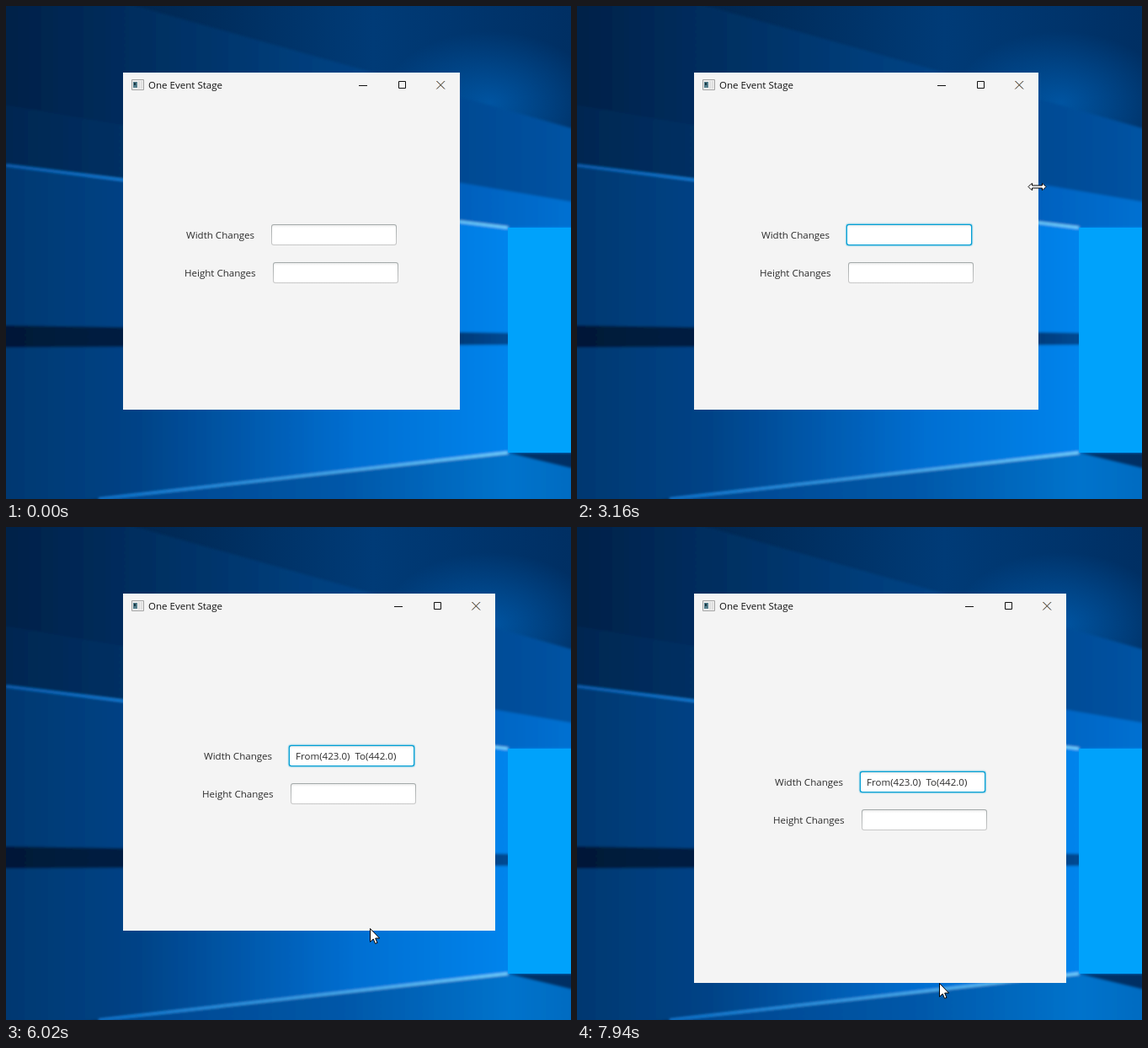
Recreate the animation shown at these times as an HTML page. Size 671 by 585 pixels, loop 8000 ms.

```html
<!DOCTYPE html>
<html lang="en">
<head>
<meta charset="utf-8">
<title>One Event Stage</title>
<style>
  html, body { margin: 0; width: 100%; height: 100%; overflow: hidden; background: #002047; }
  svg { display: block; width: 671px; height: 585px; }
  text { font: 11.55px "Open Sans", "Noto Sans", sans-serif; fill: #2b2b2b; white-space: pre; }
  #close path { mix-blend-mode: multiply; }
</style>
</head>
<body>
<svg viewBox="0 0 671 585">
  <defs>
    <linearGradient id="sky">
      <stop offset="0" stop-color="#001e43"/><stop offset=".3" stop-color="#002a57"/>
      <stop offset=".65" stop-color="#003b77"/><stop offset="1" stop-color="#002f63"/>
    </linearGradient>
    <linearGradient id="upper">
      <stop offset="0" stop-color="#002047"/><stop offset=".5" stop-color="#003d7a"/>
      <stop offset="1" stop-color="#0054a6"/>
    </linearGradient>
    <linearGradient id="middle">
      <stop offset="0" stop-color="#00264f"/><stop offset=".2" stop-color="#002f62"/>
      <stop offset=".8" stop-color="#0062c0"/><stop offset="1" stop-color="#0074d6"/>
    </linearGradient>
    <linearGradient id="floor">
      <stop offset="0" stop-color="#00376f"/><stop offset=".24" stop-color="#004387"/>
      <stop offset=".6" stop-color="#006fd2"/><stop offset="1" stop-color="#0090fb"/>
    </linearGradient>
    <linearGradient id="band">
      <stop offset="0" stop-color="#001836"/><stop offset=".8" stop-color="#002a5c"/>
      <stop offset="1" stop-color="#004a94"/>
    </linearGradient>
    <linearGradient id="ground">
      <stop offset="0" stop-color="#00438a"/><stop offset=".5" stop-color="#0057a8"/>
      <stop offset=".83" stop-color="#0073cc"/><stop offset="1" stop-color="#0068bc"/>
    </linearGradient>
    <radialGradient id="haze">
      <stop offset="0" stop-color="#0062b8" stop-opacity=".7"/>
      <stop offset="1" stop-color="#0062b8" stop-opacity="0"/>
    </radialGradient>
    <linearGradient id="ray" gradientUnits="userSpaceOnUse" x1="0" y1="0" x2="596" y2="0">
      <stop offset="0" stop-color="#0a60b4"/><stop offset=".24" stop-color="#1580dc"/>
      <stop offset="1" stop-color="#7ad6ff"/>
    </linearGradient>
    <linearGradient id="edge" x2="0" y2="1">
      <stop offset="0" stop-color="#a3a9a9"/><stop offset="1" stop-color="#c8c8c8"/>
    </linearGradient>
    <linearGradient id="inner" x2="0" y2="1">
      <stop offset="0" stop-color="#ececec"/><stop offset=".14" stop-color="#fff"/>
    </linearGradient>
    <filter id="soft"><feGaussianBlur stdDeviation="1.6"/></filter>
  </defs>

  <rect width="671" height="585" fill="url(#sky)"/>
  <ellipse cx="575" cy="115" rx="130" ry="85" fill="url(#haze)"/>
  <g filter="url(#soft)">
    <path d="M-10-46 700 153V300H-10Z" fill="url(#upper)"/>
    <path d="M-10 116 700 237V300H-10Z" fill="url(#middle)"/>
    <path d="M-10 188 596 263H700V530H596L110 585-10 600Z" fill="url(#floor)"/>
    <path d="M-10 379 600 388V402L-10 405Z" fill="url(#band)"/>
    <path d="M110 587 596 530 700 555V600H100Z" fill="url(#ground)"/>
    <path d="M0 189 596 263M110 585 596 530" stroke="url(#ray)" stroke-width="3"/>
  </g>
  <rect x="596" y="263" width="267" height="267" fill="#00a2fb"/>

  <g transform="translate(139 79)">
    <rect id="frame" fill="#f4f4f4"/>
    <path d="M10.5 8.5h14v12h-14z" fill="#eee" stroke="#a5a5a5"/>
    <path d="M12 11h5v7h-5z" fill="#527d8c"/>
    <path d="M13 12h2v3h-2z" fill="#183642"/>
    <path d="M19 10v9M22 10v9" stroke="#cfcfcf"/>
    <text x="30" y="19" style="fill:#111">One Event Stage</text>
    <g id="buttons" fill="none" stroke="#111">
      <path d="M-120 15.5h10M-72.5 10.5h8v8h-8z"/>
      <g id="close">
        <path d="M-27.8 10l9.5 9.5m0-9.5l-9.5 9.5" stroke="#b8763c"/>
        <path d="M-27.2 10l9.5 9.5m0-9.5l-9.5 9.5" stroke="#5f8fc0"/>
      </g>
    </g>
  </g>

  <g id="form">
    <text x="214" y="276">Width Changes</text>
    <text x="212" y="321">Height Changes</text>
    <g id="plain">
      <rect x="315" y="259" width="149" height="25" rx="3" fill="url(#edge)"/>
    </g>
    <g id="focus">
      <rect x="313.6" y="257.6" width="151.8" height="27.8" rx="4" fill="#039ed3" opacity=".2"/>
      <rect x="314.7" y="258.7" width="149.6" height="25.6" rx="3" fill="#039ed3"/>
    </g>
    <rect x="316" y="260" width="147" height="23" rx="2" fill="url(#inner)"/>
    <rect x="317" y="304" width="149" height="25" rx="3" fill="url(#edge)"/>
    <rect x="318" y="305" width="147" height="23" rx="2" fill="url(#inner)"/>
    <text id="value" x="323" y="276"></text>
  </g>

  <g id="cursor" fill="#fff" stroke="#000" stroke-linejoin="miter">
    <path id="arrow" d="M.5.5V16.4L4.2 12.9 6.6 18.4 9 17.4 6.7 12H11.6Z"/>
    <path id="resize" d="M-10.5 0-6.5-4H-6V-1.5H6V-4H6.5L10.5 0 6.5 4H6V1.5H-6V4H-6.5Z"/>
  </g>
</svg>
<script>
const LOOP = 8000, LEFT = 139, TOP = 79;
const $ = id => document.getElementById(id);

// Every track holds its value until the next entry: [ms, ...values].
const widths = [
  [0, 400], [3080, 404], [3160, 409], [3240, 412], [3310, 415], [3390, 417], [3470, 419],
  [3540, 421], [3620, 422], [3690, 423], [4780, 425], [4860, 427], [4940, 429], [5020, 432],
  [5100, 434], [5170, 439], [5250, 442]
];
// Window height, then the height its content is laid out for.
const heights = [
  [0, 400, 400], [7170, 403, 402], [7250, 412, 408], [7330, 426, 418],
  [7400, 440, 430], [7480, 452, 444], [7790, 460, 458], [7870, 462, 462]
];
const values = [[0, ""], [3770, "From(400.0)  To(423.0)"], [5250, "From(423.0)  To(442.0)"]];
const focused = [[0, false], [820, true], [2150, false], [2930, true]];

// arrow: tip; h / v: centre of a resize cursor; right / bottom: follows that window edge.
const pointer = [
  [0, "none", 0, 0],
  [130, "arrow", 526, 518], [170, "arrow", 466, 330], [210, "arrow", 401, 139],
  [440, "arrow", 394, 131], [520, "arrow", 382, 120], [590, "arrow", 369, 109],
  [670, "arrow", 359, 102], [740, "arrow", 352, 97],
  [980, "arrow", 428, 156], [1050, "arrow", 489, 204],
  [1280, "arrow", 498, 206], [1360, "arrow", 512, 209], [1440, "arrow", 523, 211],
  [1530, "arrow", 530, 212], [1600, "h", 538, 214], [1760, "h", 540, 214], [1910, "h", 541, 214],
  [2460, "arrow", 536, 214], [2610, "h", 537, 214],
  [3080, "right", -2, 214], [4780, "right", 0, 214],
  [5390, "arrow", 540, 282], [5470, "arrow", 430, 398], [5550, "arrow", 381, 452],
  [5630, "arrow", 432, 473], [6020, "arrow", 432, 476],
  [6170, "v", 432, 478], [6250, "v", 432, 480], [6320, "arrow", 432, 481], [6400, "arrow", 432, 482],
  [6710, "v", 432, 481], [6790, "v", 432, 480], [6940, "v", 432, 479],
  [7170, "bottom", 432, 0], [7940, "arrow", 430, 541]
];

const at = (track, t) => track.findLast(entry => entry[0] <= t).slice(1);
const set = (id, attrs) => {
  for (const name in attrs) $(id).setAttribute(name, attrs[name]);
};
const show = (id, on) => set(id, { display: on ? "inline" : "none" });

function drawPointer(t, width, height) {
  let [kind, x, y] = at(pointer, t);
  if (kind === "right") { kind = "h"; x += LEFT + width; }
  if (kind === "bottom") { kind = "v"; y += TOP + height; }
  const resizing = kind === "h" || kind === "v";
  const shift = resizing ? 0.5 : 0;
  show("arrow", kind === "arrow");
  show("resize", resizing);
  set("cursor", { transform: `translate(${x + shift} ${y + shift}) rotate(${kind === "v" ? 90 : 0})` });
}

function draw(t) {
  const [width] = at(widths, t);
  const [height, contentHeight] = at(heights, t);
  const dx = Math.round((width - 400) / 2), dy = Math.round((contentHeight - 400) / 2);
  const [hasFocus] = at(focused, t);

  set("frame", { width, height });
  set("buttons", { transform: `translate(${width})` });
  set("form", { transform: `translate(${dx} ${dy})` });
  show("focus", hasFocus);
  show("plain", !hasFocus);
  $("value").textContent = at(values, t)[0];
  drawPointer(t, width, height);
}

const start = performance.now();
function tick() {
  draw((performance.now() - start) % LOOP);
  requestAnimationFrame(tick);
}
tick();
</script>
</body>
</html>
```
